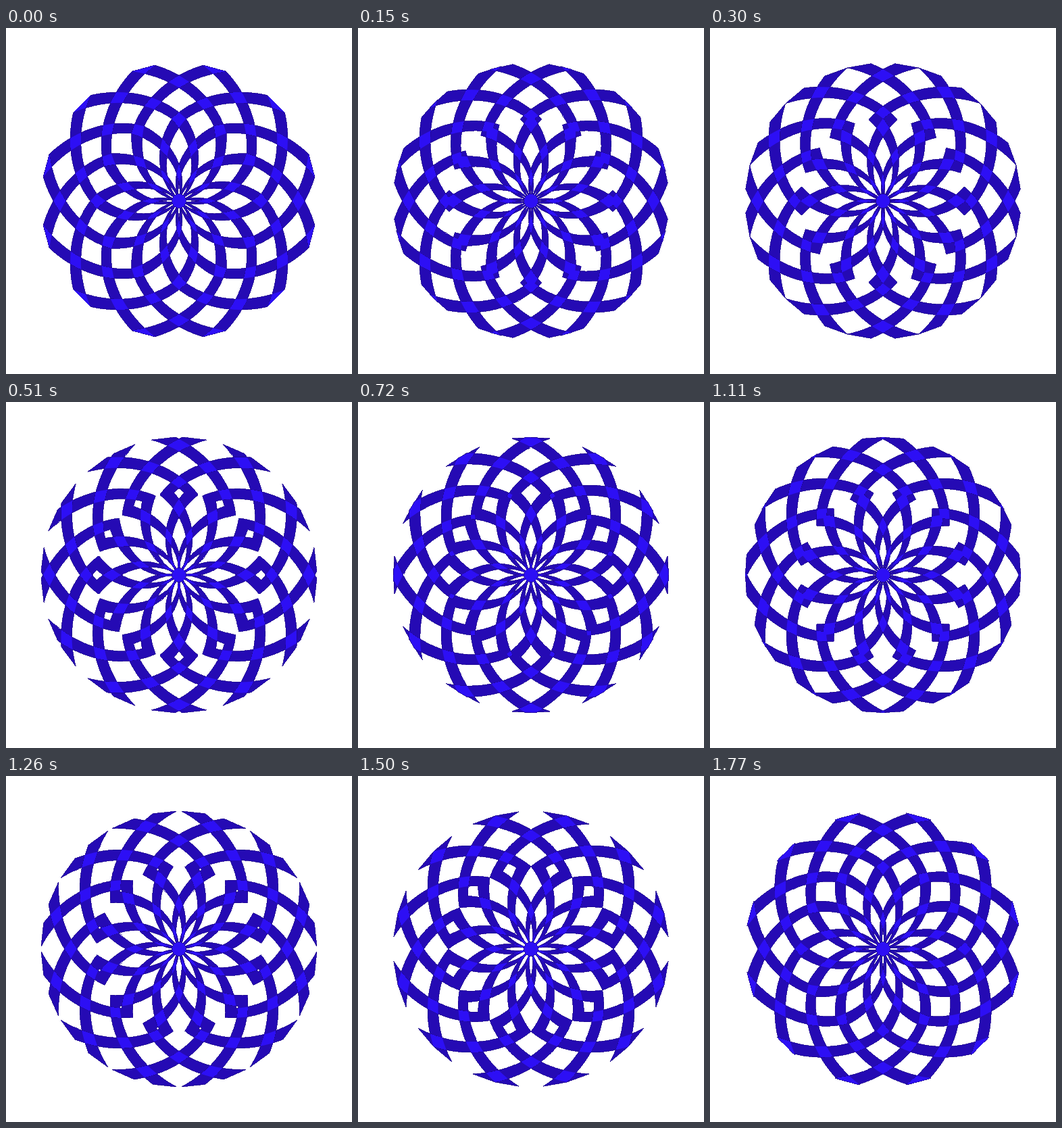
Recreate the animation shown at these times as an HTML page. Size 512x512 px, loop 1.8 s.

```html
<!DOCTYPE html>
<html lang="en">
<head>
<meta charset="utf-8">
<title>Counter-rotating rosette</title>
<style>
  html, body { margin: 0; width: 100%; height: 100%; overflow: hidden; background: #fff; }
  svg { display: block; width: 100vw; height: 100vh; shape-rendering: crispEdges; }
  .band { fill: #250ab4; stroke: #1d078f; stroke-width: .8; }
  .cross { fill: #2d0ff5; }
</style>
</head>
<body>
<svg viewBox="0 0 512 512">
  <defs>
    <clipPath id="overlap"><path class="right"/></clipPath>
  </defs>
  <g transform="translate(256 256)">
    <path class="band right"/>
    <path class="band left"/>
    <g clip-path="url(#overlap)"><path class="cross left"/></g>
    <circle class="cross" r="10.5" stroke="#1d078f" stroke-width=".8"/>
  </g>
</svg>
<script>
  const ARMS = 12, OUTER = 204, FOLD = 122, TWIST = 45, HALF = 5;
  const LOOP = 1800, STEP = 30, TURN = 360 / ARMS;

  const polar = (r, deg) => {
    const a = deg * Math.PI / 180;
    return `${(-r * Math.sin(a)).toFixed(2)} ${(-r * Math.cos(a)).toFixed(2)}`;
  };

  // Edge of one arm: a spiral in to the fold, then a reversed spiral to the centre.
  function edge(offset) {
    const points = [], n = 24;
    for (let i = 0; i <= 2 * n; i++) {
      const u = i / n - 1;
      const r = u < 0 ? FOLD - (OUTER - FOLD) * u : FOLD * (1 - u);
      points.push(polar(r, TWIST * Math.abs(u) + offset));
    }
    return points;
  }

  let outline = '';
  for (let k = 0; k < ARMS; k++) {
    const a = k * TURN;
    outline += 'M' + [...edge(a - HALF), ...edge(a + HALF).reverse()].join('L') + 'Z';
  }

  const right = document.querySelectorAll('.right');
  const left = document.querySelectorAll('.left');
  for (const path of [...right, ...left]) path.setAttribute('d', outline);

  function draw(ms) {
    const turn = Math.floor(ms % LOOP / STEP) * STEP / LOOP * TURN;
    for (const p of right) p.setAttribute('transform', `rotate(${turn})`);
    for (const p of left) p.setAttribute('transform', `scale(-1 1) rotate(${turn})`);
  }

  const start = performance.now();
  function tick() {
    draw(performance.now() - start);
    requestAnimationFrame(tick);
  }
  tick();
</script>
</body>
</html>
```
